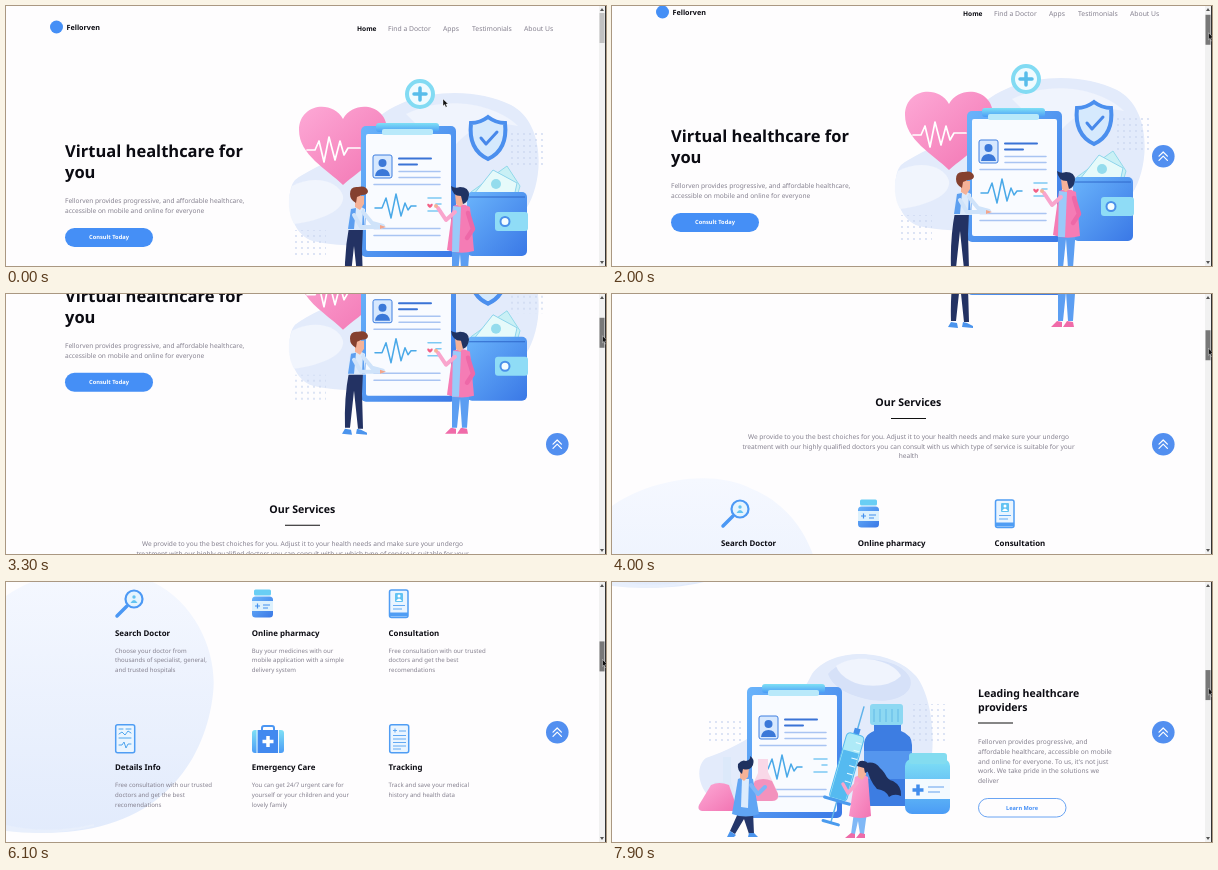
Write an HTML page that moves like this. It is 600 px wide and 260 px high and loops after 8 s.

```html
<!DOCTYPE html>
<html lang="en">
<head>
<meta charset="utf-8">
<title>Virtual healthcare</title>
<style>
html, body { margin: 0; width: 100%; height: 100%; overflow: hidden; background: #fefdfe; }
svg { display: block; width: 600px; height: 260px; }
text { font-family: "Noto Sans", "Open Sans", sans-serif; fill: #85818f; text-rendering: geometricPrecision; white-space: pre; }
.b { font-weight: 700; fill: #0b0b12; }
.w { font-weight: 700; fill: #fff; }
.l { font-weight: 700; fill: #458ff6; }
.line { fill: none; stroke-linecap: round; stroke-linejoin: round; }
</style>
</head>
<body>
<svg viewBox="0 0 600 260">
<defs>
  <linearGradient id="blue" x2="1" y2="1"><stop stop-color="#6ab4fb"/><stop offset="1" stop-color="#3a78e6"/></linearGradient>
  <linearGradient id="cyan" x2="0" y2="1"><stop stop-color="#7fe0f5"/><stop offset="1" stop-color="#4b9cf6"/></linearGradient>
  <linearGradient id="pink" x2="1" y2="1"><stop stop-color="#fda9d6"/><stop offset="1" stop-color="#f274b2"/></linearGradient>
  <linearGradient id="haze" x2="0" y2="1"><stop stop-color="#f5f8ff"/><stop offset="1" stop-color="#e2ebfc"/></linearGradient>
  <pattern id="dots" width="6" height="6" patternUnits="userSpaceOnUse"><circle cx="2" cy="2" r=".9" fill="#ccd8f0"/></pattern>

  <g id="board">
    <rect x="355" y="120" width="95" height="131" rx="5" fill="url(#blue)"/>
    <rect x="360" y="128" width="85" height="117" rx="2" fill="#f9fbff"/>
    <path d="M373 117h57q3 0 3 3v3q0 3-3 3h-57q-3 0-3-3v-3q0-3 3-3z" fill="url(#cyan)"/>
    <rect x="376" y="123" width="51" height="6" rx="2" fill="#b9e9fa"/>
    <rect x="367" y="149" width="19" height="23" rx="2" fill="#d7e8fe" stroke="#3f7fe0"/>
    <circle cx="376.500" cy="157" r="4" fill="#3b78d8"/>
    <path d="M369 170q1-7 7.500-7t7.500 7z" fill="#3b78d8"/>
    <g class="line" stroke-width="1.500">
      <path d="M393 152.500h32M393 158.500h18" stroke="#3a73d6" stroke-width="2"/>
      <path d="M393 165.500h41M393 171.500h41M368 178.500h66M368 222.500h66M368 229.500h66" stroke="#a9c4f2"/>
      <path d="M422 192h13M430 198h5M422 205h13" stroke="#7cc9f3"/>
      <path d="M369 202h7l4-10 5 20 5-24 5 22 4-13 3 7 3-4h5" stroke="#4aa9e8"/>
    </g>
  </g>

  <g id="rear">
    <path d="M0 6L6 0 12 6M0 12L6 6 12 12" class="line" stroke="#fff" stroke-width="1.700" transform="translate(547 146) scale(.7)"/>
  </g>
</defs>

<rect width="600" height="260" fill="#fefdfe"/>
<g id="page">
  <circle cx="50.500" cy="21" r="6.500" fill="#458ff6"/>
  <rect x="59" y="222" width="88" height="19" rx="9.500" fill="#458ff6"/>

  <!-- hero picture -->
  <path d="M362 122C392 84 462 78 505 99C540 117 538 176 520 203C500 236 350 247 307 235C281 227 279 185 289 174C310 158 340 153 362 122z" fill="#e3ebfb"/>
  <path d="M286 180c23-12 47-5 51 10c2 14-20 24-49 28c-6-10-7-27-2-38z" fill="#f1f5fd"/>
  <path d="M400 108c40-20 90-10 112 12c-30-7-56 4-70 30z" fill="#f0f4fd"/>
  <path d="M505 125h32v38h-32zM289 224h31v28h-31z" fill="url(#dots)"/>
  <path d="M337 113C326 93 293 98 293 124C293 149 321 163 337 179C355 163 381 149 381 124C381 98 348 93 337 113z" fill="url(#pink)"/>
  <path d="M301 144h8l4-9 5 21 5-25 6 23 5-19 4 14 4-7h12" class="line" stroke="#fff" stroke-width="1.700"/>
  <circle cx="414" cy="88" r="13" fill="#effbff" stroke="#82dbf3" stroke-width="4"/>
  <path d="M414 82v12M408 88h12" class="line" stroke="#58bdea" stroke-width="3.500"/>
  <path d="M482 111q8 6 17 6c2 18-4 30-17 36c-13-6-19-18-17-36q9 0 17-6z" fill="#d5e9fd" stroke="#4b8fee" stroke-width="4"/>
  <path d="M475 132l5 6 11-12" class="line" stroke="#4788ea" stroke-width="3"/>
  <path d="M465 186l36-26 13 20-4 14h-45z" fill="#c9f0f5" stroke="#93d9ea"/>
  <path d="M468 188l19-24 24 13-3 14z" fill="#e6fafa" stroke="#8ed4ec"/>
  <circle cx="490" cy="178" r="5" fill="#94dced"/>
  <use href="#board"/>
  <rect x="461" y="186" width="60" height="64" rx="5" fill="url(#blue)"/>
  <path d="M463 191h56" stroke="#2f69cb"/>
  <rect x="489" y="206" width="33" height="19" rx="3" fill="#8fdcf6"/>
  <circle cx="499" cy="215.500" r="4.500" fill="#f5fdff" stroke="#4a91ea" stroke-width="2"/>
  <path d="M424 202c-5-3-2-6 0-3c2-3 5 0 0 3z" fill="#f45f85"/>

  <path d="M343 221h14l-1 22 1 35h-5l-4-38-4 37h-5q-1-30 4-56z" fill="#233263"/>
  <path d="M336 283l3-5 6 1 1 5zM350 283l1-5 4 1 6 3v2z" fill="#4b94ed"/>
  <path d="M345 202q7-4 14 1l1 21h-18q0-16 3-22z" fill="#dceafb"/>
  <path d="M345 203l-3 20h6l2-21zM357 202l2 21h-3z" fill="#5d9ff0"/>
  <path d="M357 206l9 11 11 3M348 209l7 12 20 0" class="line" stroke="#cfe3fa" stroke-width="4"/>
  <path d="M374 219l6 2-6 2z" fill="#f2a58c"/>
  <path d="M349 190h9v8l-4 6-5-3z" fill="#f5b298"/>
  <path d="M344 188q0-8 8-7q8-2 10 4q0 4-6 4l-5 2-1 6q-6-3-6-9z" fill="#85402f"/>

  <path d="M446 236h18l-3 41h-5l-2-29-3 29h-5z" fill="#5c9ef2"/>
  <path d="M439 283l6-6 5 1v5zM451 283l4-6 6 1 1 5z" fill="#f06ba9"/>
  <path d="M447 200q9-4 17 1l4 44q-14 4-27-1z" fill="#f57cb5"/>
  <path d="M447 200l8 1-2 45-7 0z" fill="#9acaf9"/>
  <path d="M449 206l-9 8-8-12" class="line" stroke="#f9a5cd" stroke-width="4"/>
  <circle cx="430" cy="200" r="2" fill="#f5b298"/>
  <path d="M462 207l5 16-6 9" class="line" stroke="#ee68a8" stroke-width="4.500"/>
  <path d="M449 187h9v10l-4 4-4-3z" fill="#f5b298"/>
  <path d="M445 180q4 3 9 1q9 0 9 8q-1 8-6 9l-2-8q-9 0-10-10z" fill="#203363"/>

  <!-- services -->
  <path d="M0 462C30 440 95 422 140 445C190 465 212 520 207 560C200 622 160 690 60 698Q25 700 0 695z" fill="url(#haze)"/>
  <path d="M279 374.500h35M366 834h35" stroke="#111" stroke-width="1.200"/>
  <circle cx="128" cy="465" r="8.500" fill="#e5f4fe" stroke="#4c99f5" stroke-width="2.200"/>
  <path d="M121 472l-10 10" class="line" stroke="#4b98f4" stroke-width="3.500"/>
  <circle cx="128" cy="463" r="1.700" fill="#64c4f1"/>
  <path d="M124.500 469q3.500-6 7 0z" fill="#64c4f1"/>
  <rect x="248" y="455.500" width="17" height="6" rx="1.500" fill="#69cef4"/>
  <rect x="246" y="462.500" width="21" height="21" rx="3.500" fill="url(#blue)"/>
  <rect x="246" y="467" width="21" height="10" fill="#ddf1fd"/>
  <path d="M251.500 469.500v5M249 472h5M257 471h7M257 474h5" stroke="#4290ee" stroke-width="1.200"/>
  <g fill="#eaf5ff" stroke="#4f9df4" stroke-width="1.500">
    <rect x="383.500" y="456" width="18.500" height="27.500" rx="2"/>
    <rect x="109.700" y="590.700" width="19" height="28" rx="2"/>
    <rect x="383.700" y="590.700" width="19" height="28" rx="2"/>
  </g>
  <path d="M384 480.500h18" stroke="#4f9df4" stroke-width="4"/>
  <rect x="389" y="459" width="8" height="9" rx="1" fill="#62c3f3"/>
  <circle cx="393" cy="462" r="1.500" fill="#fff"/>
  <path d="M390 467q3-5 6 0z" fill="#fff"/>
  <path d="M387 471.500h12M387 475h9M393 597h7M387 601.500h13M387 605h13M387 608.500h13M387 612h13M387 615h8M387 596.500h4M389 594.500v4" stroke="#62a9f3" stroke-width="1.100"/>
  <path d="M113 595h4M113 600l3-2 3 3 3-4 3 2M120 595h5M113 604h12M113 611h3l2-3 2 6 2-4h3" class="line" stroke="#4fa5ee"/>
  <path d="M256 597v-3q0-2 2-2h8q2 0 2 2v3" class="line" stroke="#4b96f3" stroke-width="2"/>
  <rect x="246" y="596" width="32" height="23" rx="3" fill="url(#cyan)"/>
  <path d="M251.500 596h20.500v23h-20.500z" fill="#4289ef"/>
  <path d="M251 596v23M272.500 596v23" stroke="#e8f6ff"/>
  <path d="M262 602v11M256.500 607.500h11" stroke="#fff" stroke-width="3.500"/>

  <!-- providers picture -->
  <path d="M0 691Q42 701 88 690L88 692Q45 703 0 697z" fill="#e8effc"/>
  <g transform="translate(0 693)">
    <path d="M200 92C220 64 280 66 304 94C326 122 326 194 305 218L130 230C86 224 80 186 94 176C130 164 180 134 200 92z" fill="#e3ebfb"/>
    <path d="M216 92c18-22 72-18 82 4c6 18-22 28-48 20c-16-4-30-12-34-24z" fill="#d6e1f8"/>
    <path d="M224 84c20-14 58-6 65 10c-12 12-36 12-50 5q-12-6-15-15z" fill="#f0f4fd"/>
    <path d="M93 138h36v24h-36zM300 122h34v38h-34z" fill="url(#dots)"/>
    <path d="M111 175h8v25l8 24q0 5-4 5h-33q-5-1-3-6l16-23h8z" fill="#dce9fa"/>
    <path d="M99 203q8-4 18 0l7 20q0 6-4 6h-30q-5-1-3-6z" fill="url(#pink)"/>
    <use href="#board" transform="translate(-220 -15)"/>
    <path d="M146 177h10v13l10 21q2 8-6 8h-20q-5-2-3-8l9-20z" fill="#f9d8e8"/>
    <path d="M143 199q8-4 17 0l6 13q1 7-6 7h-20q-5-2-3-7z" fill="#f392bd"/>

    <path d="M262 140h27v9q11 4 11 14v57q0 4-4 4h-40q-4 0-4-4v-57q0-10 10-14z" fill="#3d7de2"/>
    <path d="M252 169h48v28h-48z" fill="#5596ee"/>
    <rect x="258" y="122" width="33" height="21" rx="3" fill="#8dd8f2"/>
    <path d="M262 127v13M268 127v13M274 127v13M280 127v13M286 127v13" stroke="#63bae7"/>
    <g transform="translate(235 184) rotate(16)">
      <path d="M0-62v28M0 33v25" stroke="#60b3ea" stroke-width="1.500"/>
      <path d="M-3-39h6v7h-6z" fill="#438eea"/>
      <rect x="-9" y="-33" width="18" height="68" rx="4" fill="#aeeaf7" stroke="#56baf0"/>
      <path d="M-8-15h16v49h-16z" fill="#55baf0"/>
      <path d="M2-25h6M2-17h6M2-9h6M2-1h6M2 7h6M2 15h6" stroke="#e8fbff"/>
      <path d="M-13 36h26M-8 59h16" class="line" stroke="#4b9bee" stroke-width="3"/>
    </g>
    <rect x="293" y="177" width="45" height="55" rx="7" fill="url(#cyan)"/>
    <rect x="297" y="171" width="38" height="11" rx="3" fill="#83dcf0"/>
    <path d="M293 197h45v20h-45z" fill="#f3faff"/>
    <path d="M306 202.500v11M300.500 208h11" stroke="#418ded" stroke-width="3.500"/>
    <path d="M316 205h16M316 210h12" stroke="#94bff3" stroke-width="1.500"/>

    <path d="M127 229h14l1 23h-5l-5-15-9 15-5-3z" fill="#25376b"/>
    <path d="M115 255l3-6 6 4-2 2zM136 255l1-4 5 0 4 4z" fill="#4b94ed"/>
    <path d="M126 197q8-4 15 0l6 35q-13 5-27 0z" fill="#60a5f4"/>
    <path d="M130 197h7l-1 29-7-1z" fill="#dcecfd"/>
    <path d="M139 203l7 9 7-7" class="line" stroke="#7db6f7" stroke-width="4"/>
    <path d="M128 186h9l-1 9-4 4-4-3z" fill="#f5b298"/>
    <path d="M126 182q4-5 8-3q5-1 4-5q5 3 3 9q-3 6-10 4l-1 5q-5-4-4-10z" fill="#1f315f"/>

    <path d="M242 230h13l-3 22h-4l-2-13-3 13h-4z" fill="#80b8f6"/>
    <path d="M233 256l6-5 4 1v4zM244 256l4-5 5 1v4z" fill="#ee6ba8"/>
    <path d="M254 181q9-2 14 5c8 7 5 11 13 13q9 5 8 15q-7-3-12 1q-3-7-12-8q-9-10-11-26z" fill="#1f2f5c"/>
    <path d="M243 195q7-4 13 0l3 39q-11 4-22 0z" fill="url(#pink)"/>
    <path d="M245 201l-9 10-5-9" class="line" stroke="#f8a3ca" stroke-width="3.500"/>
    <path d="M246 184h8v9l-4 5-4-3z" fill="#f5b298"/>
    <path d="M245 184q1-6 7-5q6 1 5 10l-4 2-1-5z" fill="#1f2f5c"/>
  </g>
  <rect x="366.500" y="909.500" width="87.500" height="18.500" rx="9.250" fill="#fefdfe" stroke="#6aa4f3"/>
</g>

<g id="top"><circle cx="551.300" cy="150.300" r="11.300" fill="#528ff0"/><use href="#rear"/></g>
<rect x="593" width="6" height="260" fill="#f1f1f1"/>
<path d="M594 5l2-3 2 3zM594 255l2 3 2-3z" fill="#555"/>
<rect id="thumb" x="593.500" width="5" height="30"/>
<rect x="599" width="1" height="260" fill="#333"/>
<path id="arrow" d="M0 0v7l1.600-1.400 1.200 2.600 1.300-.6-1.200-2.500h2.200z" fill="#111" stroke="#fff" stroke-width=".4"/>
</svg>
<script>
const $ = id => document.getElementById(id);
const page = $('page');

function write(x, y, size, cls, lines, gap = 9.6, anchor = 'start') {
  lines.split('|').forEach((line, i) => {
    const el = document.createElementNS('http://www.w3.org/2000/svg', 'text');
    const attrs = { x, y: y + i * gap, 'font-size': size, class: cls, 'text-anchor': anchor };
    for (const k in attrs) el.setAttribute(k, attrs[k]);
    el.textContent = line;
    page.append(el);
  });
}

write(60.5, 23.8, 7.2, 'b', 'Fellorven');
write(351, 24.5, 6.6, 'b', 'Home');
[[382, 'Find a Doctor'], [437, 'Apps'], [466, 'Testimonials'], [518, 'About Us']]
  .forEach(([x, label]) => write(x, 24.5, 6.8, '', label));
write(59, 150.8, 16.5, 'b', 'Virtual healthcare for|you', 21.6);
write(59, 197.3, 6.58, '', 'Fellorven provides progressive, and affordable healthcare,|accessible on mobile and online for everyone');
write(103, 233.4, 5.7, 'w', 'Consult Today', 0, 'middle');

write(296.3, 362, 10.6, 'b', 'Our Services', 0, 'middle');
write(296.5, 395.3, 6.58, '', 'We provide to you the best choiches for you. Adjust it to your health needs and make sure your undergo|treatment with our highly qualified doctors you can consult with us which type of service is suitable for your|health', 9.5, 'middle');

const free = 'Free consultation with our trusted|doctors and get the best|recomendations';
[
  ['Search Doctor', 'Choose your doctor from|thousands of specialist, general,|and trusted hospitals'],
  ['Online pharmacy', 'Buy your medicines with our|mobile application with a simple|delivery system'],
  ['Consultation', free],
  ['Details Info', free],
  ['Emergency Care', 'You can get 24/7 urgent care for|yourself or your children and your|lovely family'],
  ['Tracking', 'Track and save your medical|history and health data']
].forEach(([title, body], i) => {
  const x = 109 + i % 3 * 136.8, y = 501.8 + (i > 2) * 134.5;
  write(x, y, 7.9, 'b', title);
  write(x, y + 17, 6.08, '', body);
});

write(366, 807.8, 10.5, 'b', 'Leading healthcare|providers', 13.8);
write(366, 855.3, 6.58, '', "Fellorven provides progressive, and|affordable healthcare, accessible on mobile|and online for everyone. To us, it's not just|work. We take pride in the solutions we|deliver");
write(410, 920.7, 5.6, 'l', 'Learn More', 0, 'middle');

// [time, scroll offset]
const scrollKeys = [[1600, 0], [1800, 12], [1900, 12], [2000, 15], [2800, 67], [4000, 250], [4500, 307], [4600, 307],
  [4700, 328], [4900, 328], [5000, 336], [5200, 336], [5300, 345], [6100, 448], [6200, 448], [7200, 600], [7900, 693]];

function at(keys, t) {
  const i = keys.findIndex(k => k[0] >= t);
  if (i < 0) return keys[keys.length - 1][1];
  if (!i) return keys[0][1];
  const [t0, a] = keys[i - 1], [t1, b] = keys[i];
  return a + (b - a) * (t - t0) / (t1 - t0);
}

function draw(now) {
  const t = Math.floor(now % 8000 / 100) * 100; // the screen refreshes ten times a second
  const scroll = at(scrollKeys, t), drag = scroll * .117;
  const x = at([[300, 437], [900, 596.5]], t), y = at([[300, 93], [900, 25]], t) + drag;
  page.setAttribute('transform', `translate(0 ${-scroll})`);
  $('top').style.display = scroll ? '' : 'none';
  $('thumb').setAttribute('y', 7 + drag);
  $('thumb').setAttribute('fill', t < 900 ? '#c1c1c1' : t < 1400 ? '#a8a8a8' : '#787878');
  $('arrow').setAttribute('transform', `translate(${x} ${y})`);
  requestAnimationFrame(draw);
}
draw(performance.now());
</script>
</body>
</html>
```
